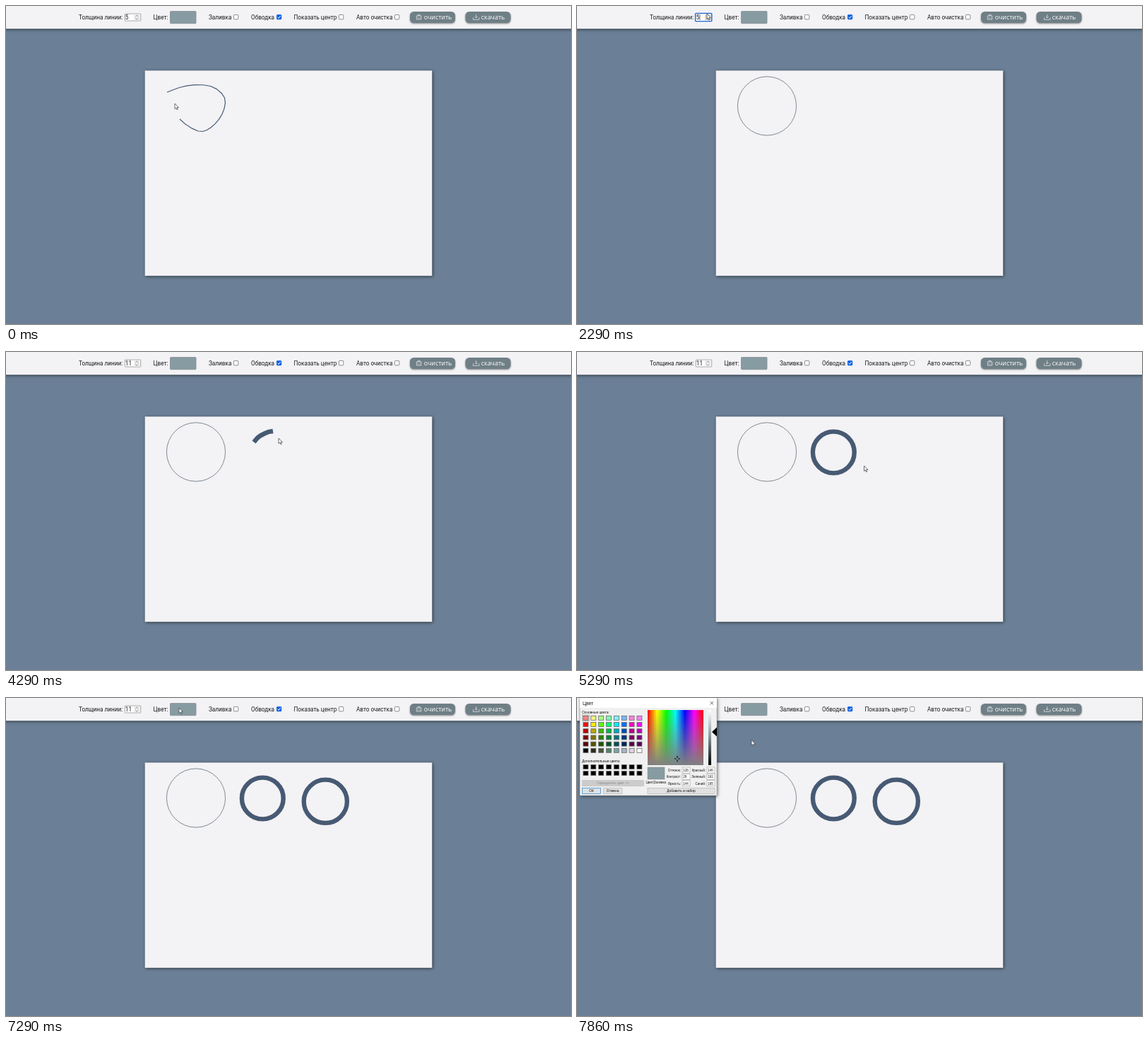
Recreate the animation shown at these times as an HTML page. Size 800x450 px, loop 8000 ms.

```html
<!DOCTYPE html>
<html lang="ru">
<head>
<meta charset="utf-8">
<style>
  html, body { margin: 0; width: 100%; height: 100%; overflow: hidden; background: #6b8096; }
  svg { display: block; width: 100vw; height: 100vh; }
  text { font: 8.2px Roboto, sans-serif; fill: #1b1b1d; white-space: pre; }
  .button text { font: 8.9px "Open Sans", sans-serif; fill: #fff; }
  .button rect { fill: #6f7f86; filter: drop-shadow(0 1px 1.2px #0007); }
  .button path { fill: none; stroke: #e4e9eb; stroke-width: .75; }
  .panel { fill: #f3f2f5; filter: drop-shadow(1px 1.5px 2px #0009); }
  .ink { fill: none; stroke: #475a73; stroke-linejoin: round; }
  #dialog { transform-origin: 101px 69px; filter: drop-shadow(1px 1.5px 2px #0008); }
  #dialog text { font: 4.9px "Liberation Sans", Arial, sans-serif; fill: #111; }
  #dialog .title { font-size: 6.8px; }
  #dialog .small { font-size: 4.5px; }
  #dialog .off { fill: #8b8b8b; }
  .end { text-anchor: end; }
  .mid { text-anchor: middle; }
</style>
</head>
<body>
<svg viewBox="0 0 800 450">
  <defs>
    <linearGradient id="hues"></linearGradient>
    <linearGradient id="fade" x2="0" y2="1">
      <stop stop-color="#808080" stop-opacity="0"/><stop offset="1" stop-color="#808080"/>
    </linearGradient>
    <linearGradient id="light" x2="0" y2="1">
      <stop stop-color="#fff"/><stop offset=".45" stop-color="#8ca1a5"/><stop offset="1"/>
    </linearGradient>
  </defs>
  <rect width="800" height="450" fill="#6b8096"/>
  <rect class="panel" x="196.7" y="91.4" width="406.6" height="290.4"/>
  <g id="drawing"></g>
  <rect class="panel" x="-5" y="-5" width="810" height="37.2"/>
  <g id="toolbar">
    <text x="103" y="18.6">Толщина линии:</text>
    <rect id="field" fill="#fff"/>
    <text id="value" x="168.8" y="19.2"></text>
    <path id="caret" d="M174 12v8" stroke="#111" stroke-width=".6"/>
    <rect id="spinner" x="181" y="11.7" width="8.5" height="8.6"/>
    <path d="M183.3 14.9l2-1.8 2 1.8M183.3 17.3l2 1.8 2-1.8" fill="none" stroke="#777" stroke-width=".8"/>
    <text x="208.5" y="18.6">Цвет:</text>
    <rect x="232.5" y="7.5" width="36.5" height="17.2" rx="1" fill="#879ba2" stroke="#8f959d"/>
  </g>
  <g class="button">
    <rect x="572" y="8" width="64" height="16" rx="5.5"/>
    <path d="M581.3 14h6.6v5h-6.6zM583 14v-1.5h3.2V14M583.3 16v1.8M585.9 16v1.8"/>
    <text x="591.7" y="19.3">очистить</text>
    <rect x="650.5" y="8" width="64" height="16" rx="5.5"/>
    <path d="M661.5 16.3v3h8.5v-3M665.7 12v4.8M663.9 15.2l1.8 1.8 1.8-1.8"/>
    <text x="672.8" y="19.3">скачать</text>
  </g>
  <g id="dialog"></g>
  <path id="cursor" d="M0 0v7.6l1.8-1.6 1.3 2.8 1.2-.6-1.2-2.6h2.3z" fill="#fff" stroke="#333" stroke-width=".7"/>
</svg>
<script>
const FRAME = 1000 / 7, FRAMES = 56;
const $ = id => document.getElementById(id);
const clamp = (v, lo, hi) => Math.min(hi, Math.max(lo, v));
const show = (node, on) => { node.style.display = on ? '' : 'none'; };

function set(node, attrs) {
  for (const key in attrs) node.setAttribute(key, attrs[key]);
  return node;
}
function add(parent, tag, attrs, text) {
  const node = set(document.createElementNS('http://www.w3.org/2000/svg', tag), attrs);
  if (text) node.textContent = text;
  parent.append(node);
  return node;
}

// Catmull-Rom position at p = 0..1 along evenly timed points
function spline(points, p) {
  const last = points.length - 1;
  const i = Math.min(Math.floor(p * last), last - 1), t = p * last - i;
  const [a, b, c, d] = [-1, 0, 1, 2].map(k => points[clamp(i + k, 0, last)]);
  return b.map((v, n) => v + t / 2 * (c[n] - a[n]
    + t * (2 * a[n] - 5 * v + 4 * c[n] - d[n] + t * (3 * (v - c[n]) + d[n] - a[n]))));
}

// Toolbar checkboxes
function checkbox(label, x, boxX, checked) {
  const color = checked ? '#0b5fe0' : '#707070';
  add($('toolbar'), 'text', { x, y: 18.6 }, label);
  add($('toolbar'), 'rect', {
    x: boxX + .4, y: 12.4, width: 6.4, height: 6.4, rx: 1,
    'stroke-width': .8, fill: checked ? color : '#fff', stroke: color
  });
  if (checked) add($('toolbar'), 'path', {
    d: `M${boxX + 1.7} 15.7l1.4 1.5 2.6-3.2`, fill: 'none', stroke: '#fff'
  });
}
checkbox('Заливка', 287, 322);
checkbox('Обводка', 347, 383, true);
checkbox('Показать центр', 407.5, 471);
checkbox('Авто очистка', 496, 550);

// Colour dialog
const dialog = $('dialog');
const box = (x, y, width, height, fill, stroke = 'none', w = .6) =>
  add(dialog, 'rect', { x, y, width, height, fill, stroke, 'stroke-width': w });
const label = (x, y, text, cls = '') => add(dialog, 'text', { x, y, class: cls }, text);
const button = (x, y, w, h, text, stroke = '#adadad') => {
  box(x, y, w, h, '#e1e1e1', stroke);
  label(x + w / 2, y + h / 2 + 1.8, text, 'mid');
};
const swatch = (col, y, fill) => box(8.9 + col * 10.86, y - 3, 7, 6, fill, '#666', .8);

for (let i = 0; i <= 6; i++)
  add($('hues'), 'stop', { offset: i / 6, 'stop-color': `hsl(${i * 60} 100% 50%)` });

box(4, 0, 194, 138, '#f0f0f0', '#999', .5);
box(4, 0, 194, 14, '#fff');
label(8, 9.8, 'Цвет', 'title');
add(dialog, 'path', { d: 'M188.7 5l4.4 4.4m0-4.4l-4.4 4.4', stroke: '#333', 'stroke-width': .7 });

label(7, 22, 'Основные цвета:');
[0, 55, 100, 145, 185, 215, 315, 300].forEach((hue, col) => {
  for (let row = 0; row < 5; row++)
    swatch(col, 28.3 + row * 9.2, `hsl(${hue} 100% ${75 * .69 ** row}%)`);
  swatch(col, 74.3, `hsl(${hue} 20% ${col / 7 * 100}%)`);
});
set(box(7.6, 24, 9.6, 8.6, 'none', '#222', .5), { 'stroke-dasharray': '1 .7' });
label(7, 90.5, 'Дополнительные цвета:');
for (let i = 0; i < 16; i++) swatch(i % 8, i < 8 ? 97.5 : 106.5, '#000');
box(7.3, 116.5, 87, 8.3, '#ccc', '#bfbfbf');
label(51, 122.4, 'Определить цвет >>', 'mid off');
button(7.3, 127.5, 26.3, 8, 'ОК', '#0078d7');
button(37.3, 127.5, 26.7, 8, 'Отмена');
button(100, 127.5, 95, 8, 'Добавить в набор');

box(100, 17, 79, 78, 'url(#hues)');
box(100, 17, 79, 78, 'url(#fade)');
add(dialog, 'path', { d: 'M142 82v2.6M142 87.4v2.6M138 86h2.6M143.4 86h2.6', stroke: '#000', 'stroke-width': 1.2 });
box(186, 17, 4, 78, 'url(#light)');
add(dialog, 'path', { d: 'M191 48l7-6.5v13z' });
box(100, 98, 24, 17, '#879ba2', '#888', .5);
label(97.5, 121.3, 'Цвет|Заливка', 'small');
['Оттенок: 126', 'Контраст: 29', 'Яркость: 144', 'Красный: 140', 'Зеленый: 161', 'Синий: 165']
  .forEach((entry, i) => {
    const [name, n] = entry.split(' ');
    const x = i < 3 ? 147 : 182, y = 98 + i % 3 * 9.4;
    label(x, y + 5.8, name, 'small end');
    box(x + 2, y, 11, 8, '#fff', '#888', .5);
    label(x + 3.2, y + 5.8, n, 'small');
  });

// Strokes grow from start to last, then snap to a circle one frame later
const strokes = [
  {
    start: -7, last: 1, width: 1.2, circle: [269, 141.5, 41.6], rim: 1, color: '#7f8b92',
    points: [[228, 122], [256, 112.8], [290, 113.5], [309.5, 130], [306, 153], [290, 172], [272, 177], [246, 160], [239, 138]]
  },
  {
    start: 28, last: 36, width: 6.5, circle: [363.3, 142, 29.4], rim: 6.4,
    points: [[351, 127.5], [360, 118.5], [378, 112], [386, 122], [391, 142], [380, 165], [356, 170], [338, 158], [335, 138]]
  },
  {
    start: 41, last: 46, width: 6.5, circle: [452.3, 146.3, 30.6], rim: 6.3,
    points: [[462, 115], [466, 118], [455, 136], [446, 156], [440, 172], [439, 176.5]]
  }
];
for (const s of strokes) {
  const [cx, cy, r] = s.circle;
  s.line = add($('drawing'), 'polyline', { class: 'ink', 'stroke-width': s.width });
  s.ring = add($('drawing'), 'circle', { class: 'ink', cx, cy, r, 'stroke-width': s.rim });
  if (s.color) s.ring.style.stroke = s.color;
}

// Cursor travel between strokes
const SPINNER = [184, 11], SWATCH = [245, 14];
const first = s => s.points[0], end = s => s.points[s.points.length - 1];
const easeOut = p => 1 - (1 - p) ** 2;
const [thin, ring, bar] = strokes;
const moves = [
  { start: 1, last: 9, points: [end(thin), SPINNER], ease: easeOut },
  { start: 24, last: 28, points: [SPINNER, first(ring)] },
  { start: 36, last: 41, points: [end(ring), [406.5, 161], [442, 186], [466, 190], [467, 150], first(bar)] },
  { start: 46, last: 48, points: [end(bar), SWATCH] },
  { start: 51, last: 55, points: [SWATCH, [247, 59.5]] }
];
const segments = [...strokes, ...moves].sort((a, b) => a.start - b.start);
const progress = (s, f) => clamp((f - s.start) / (s.last - s.start), 0, 1);

function cursorAt(f) {
  const s = segments.findLast(seg => seg.start <= f);
  // The ink trails the pointer by one frame
  const p = progress(s, s.line ? f + 1 : f);
  return spline(s.points, s.ease ? s.ease(p) : p);
}

function render(f) {
  for (const s of strokes) {
    const p = progress(s, f), steps = Math.ceil(p * 24);
    const path = Array.from({ length: steps + 1 }, (_, i) => spline(s.points, p * i / (steps || 1)));
    s.line.setAttribute('points', path.join(' '));
    show(s.line, f >= s.start && f <= s.last);
    show(s.ring, f > s.last);
  }

  const focused = f >= 15 && f < 28;
  const value = 5 + clamp(Math.floor((f - 16) * .75), 0, 6);
  set($('field'), focused
    ? { x: 167.6, y: 10.4, width: 23.2, height: 11.2, rx: 1.2, stroke: '#1767d2', 'stroke-width': 1.4 }
    : { x: 168.3, y: 11, width: 22.4, height: 10, rx: .6, stroke: '#858585', 'stroke-width': .7 });
  $('spinner').setAttribute('fill', f >= 9 && f < 25 ? '#d6d6d6' : '#ededed');
  $('value').textContent = value;
  show($('caret'), focused && value === 5);

  const fade = clamp((f - 52) / 2, 0, 1);
  show(dialog, fade > 0);
  dialog.style.opacity = 1 - (1 - fade) * .64;
  dialog.style.transform = `scale(${1 - (1 - fade) * .046})`;

  $('cursor').setAttribute('transform', `translate(${cursorAt(f)})`);
}

let shown = -1;
function tick() {
  const f = Math.floor((performance.now() + 3) / FRAME) % FRAMES;
  if (f !== shown) render(shown = f);
  requestAnimationFrame(tick);
}
tick();
</script>
</body>
</html>
```
